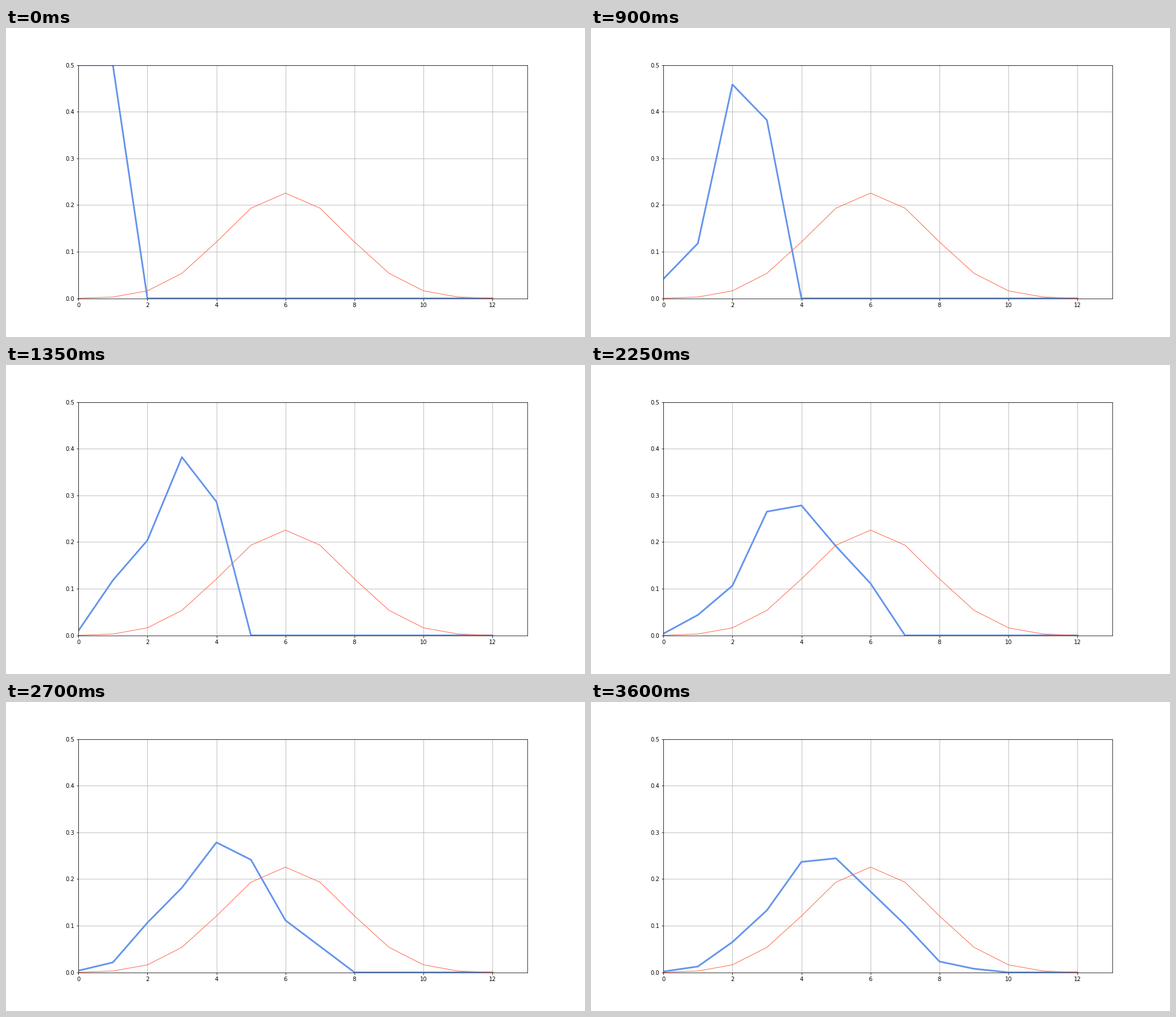
Write a matplotlib script that moves like this. It is 1025 by 547 pixels and loops after 4050 ms.

```python
import math

import matplotlib.pyplot as plt
import numpy as np
from matplotlib.animation import FuncAnimation

W, H, DPI = 1025, 547, 72
N = 12          # particles in the two-urn diffusion model
STEPS = 9
INTERVAL = 450

states = np.arange(N + 1)
limit = np.array([math.comb(N, k) for k in states]) / 2**N


def step(p):
    """One draw: state k moves down with chance k/N, otherwise up."""
    q = np.zeros_like(p)
    q[:-1] += p[1:] * states[1:] / N
    q[1:] += p[:-1] * (N - states[:-1]) / N
    return q


def distribution(n):
    p = np.zeros(N + 1)
    p[:2] = 0.5
    for _ in range(n):
        p = step(p)
    return p


plt.rcParams["font.family"] = "DejaVu Sans"
plt.rcParams["font.size"] = 10

fig, ax = plt.subplots(figsize=((W + 1e-4) / DPI, (H + 1e-4) / DPI), dpi=DPI,
                       facecolor="white")
fig.subplots_adjust(left=0.125, right=0.9, bottom=0.125, top=0.88)
ax.set_xlim(0, N + 1)
ax.set_ylim(0, 0.5)
ax.grid(True)

chain, = ax.plot(states, distribution(0), color="cornflowerblue", lw=3)
ax.plot(states, limit, color="tomato", lw=1)


def draw(i):
    chain.set_ydata(distribution(i))
    return chain,


anim = FuncAnimation(fig, draw, frames=STEPS, interval=INTERVAL,
                     repeat=True, repeat_delay=0, blit=False)
plt.show()
```
